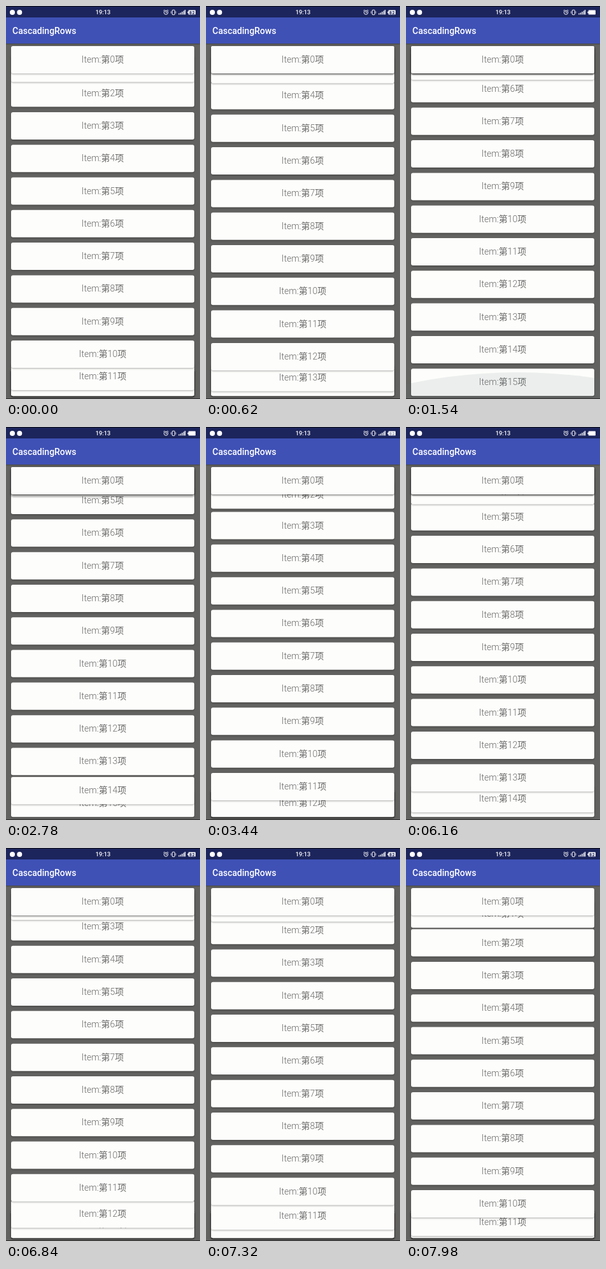
Write an HTML page that moves like this. It is 305 px wide and 618 px high and loops after 8000 ms.

```html
<!DOCTYPE html>
<html lang="zh-CN">
<head>
<meta charset="utf-8">
<title>Stacking card list</title>
<style>
  html, body { margin: 0; width: 100%; height: 100%; overflow: hidden; background: #626260; }
  #stage { position: relative; width: 305px; height: 618px; overflow: hidden; background: #626260;
    font-family: Roboto, "Noto Sans CJK SC", "Noto Sans CJK", sans-serif; }
  #status, #bar { position: absolute; left: 0; width: 305px; }
  #status { top: 0; height: 18px; background: linear-gradient(#05070f 1px, #1c255c 1px); }
  #bar { top: 18px; height: 41px; background: #3f51b5; box-shadow: 0 1px 2px rgba(0,0,0,.3);
    color: #fff; font-weight: 500; font-size: 14px; line-height: 42px; text-indent: 10px; }
  #list { position: absolute; inset: 58px 0 1px; overflow: hidden; }
  .card { position: absolute; left: 8px; top: 5px; width: 288px; height: 42.6px; border-radius: 3px;
    background: #fdfefb; box-shadow: 0 1.5px 2.5px rgba(0,0,0,.26); color: #6a6a6a;
    font-size: 14px; font-weight: 300; line-height: 43px; text-align: center; white-space: nowrap; }
  #glows { position: absolute; inset: 0; z-index: 50; }
  #edge { position: absolute; left: 0; bottom: 0; width: 305px; height: 1px; background: #2b2b2b; }
  svg text { font-family: Roboto, sans-serif; }
</style>
</head>
<body>
<div id="stage">
  <div id="list">
    <svg id="glows" width="305" height="559">
      <ellipse id="topGlow" cx="185" rx="560" fill="#5365b0"/>
      <ellipse id="bottomGlow" cx="175" rx="560" fill="#62707e"/>
    </svg>
  </div>
  <div id="bar">CascadingRows</div>
  <svg id="status" width="305" height="18" fill="#fff">
    <circle cx="10" cy="10" r="4"/>
    <circle cx="21.3" cy="10" r="4"/>
    <text x="152.5" y="13.2" font-size="9.3" font-weight="500" text-anchor="middle">19:13</text>
    <g fill="none" stroke="#fff">
      <circle cx="251.5" cy="10.2" r="3.1"/>
      <path d="M251.5 8.2v2.2h1.6M247.6 7.4l1.8-1.6M255.4 7.4l-1.8-1.6" stroke-width=".9"/>
      <rect x="261.3" y="6.3" width="4" height="7.4" rx=".8"/>
      <path d="M259.5 8.3v3.4M267 8.3v3.4" stroke-width=".7"/>
      <path d="M272 13.5v-2M274.5 13.5v-3M277 13.5v-4.5M279.5 13.5v-6M281.5 13.5v-7.5" stroke-width="1.4"/>
    </g>
    <path d="M285.5 8.8h1.3v-1.6q0-.7.7-.7h9.8q.7 0 .7.7v5.6q0 .7-.7.7h-9.8q-.7 0-.7-.7v-1.6h-1.3z"/>
    <text id="charge" x="292.4" y="12.7" font-size="7.5" font-weight="700" fill="#1c255c" text-anchor="middle">82</text>
  </svg>
  <div id="edge"></div>
</div>
<script>
const LOOP = 8000, COUNT = 16, PITCH = 51.3, HALF = PITCH / 2, LAST = 507.2;
const el = id => document.getElementById(id);
const clamp = x => Math.min(1, Math.max(0, x));

const drag = u => (1 - Math.cos(Math.PI * u)) / 2;
const fling = u => 1 - (1 - u) ** 2.5;

// Each gesture carries the scroll on from where the previous one left it.
const START = 50;
const gestures = [
  { from: 0, until: 1300, to: 262.3, ease: drag },
  { from: 2700, until: 3640, to: 79.6, ease: fling },
  { from: 3940, until: 4680, to: 0, ease: drag },
  { from: 5330, until: 6340, to: 216, ease: drag },
  { from: 6383, until: 7980, to: 38, ease: fling },
];
const scrollAt = t => gestures.reduce((pos, g) =>
  pos + (g.to - pos) * g.ease(clamp((t - g.from) / (g.until - g.from))), START);

const swell = (t, from, until) => Math.sin(Math.PI * clamp((t - from) / (until - from)));
const faded = (t, from, until) => clamp(Math.min(t - from, until - t) / 300);

// Cards slow to half speed near an edge and then stay pinned to it.
const pin = d => d >= HALF ? d : Math.max(0, (d + HALF) / 2);

function cardTop(i, scroll) {
  if (i === 0) return 0;
  if (i === COUNT - 1) return LAST;
  return LAST - pin(LAST - pin(i * PITCH - scroll));
}

const cards = Array.from({ length: COUNT }, (_, i) => {
  const card = document.createElement('div');
  card.className = 'card';
  card.style.zIndex = COUNT - i;
  card.textContent = `Item:第${i}项`;
  el('list').append(card);
  return card;
});

function setGlow(glow, strength, stretch, edge, side) {
  const scale = strength * stretch, ry = 560 * scale;
  glow.setAttribute('ry', ry);
  glow.setAttribute('cy', edge + side * (61 * scale - ry));
  glow.setAttribute('opacity', .18 * strength);
}

function draw(t) {
  const scroll = scrollAt(t);
  cards.forEach((card, i) => {
    card.style.transform = `translateY(${cardTop(i, scroll).toFixed(2)}px)`;
  });
  setGlow(el('topGlow'), swell(t, 4680, 5510), .52, 0, 1);
  setGlow(el('bottomGlow'), swell(t, 1250, 2570), 1.05, 559, -1);
  el('charge').setAttribute('opacity', 1 - faded(t, 650, 3600) - faded(t, 5600, 6650));
}

const start = performance.now();
function tick(now) {
  draw(Math.max(0, now - start) % LOOP);
  requestAnimationFrame(tick);
}
draw(0);
requestAnimationFrame(tick);
</script>
</body>
</html>
```
